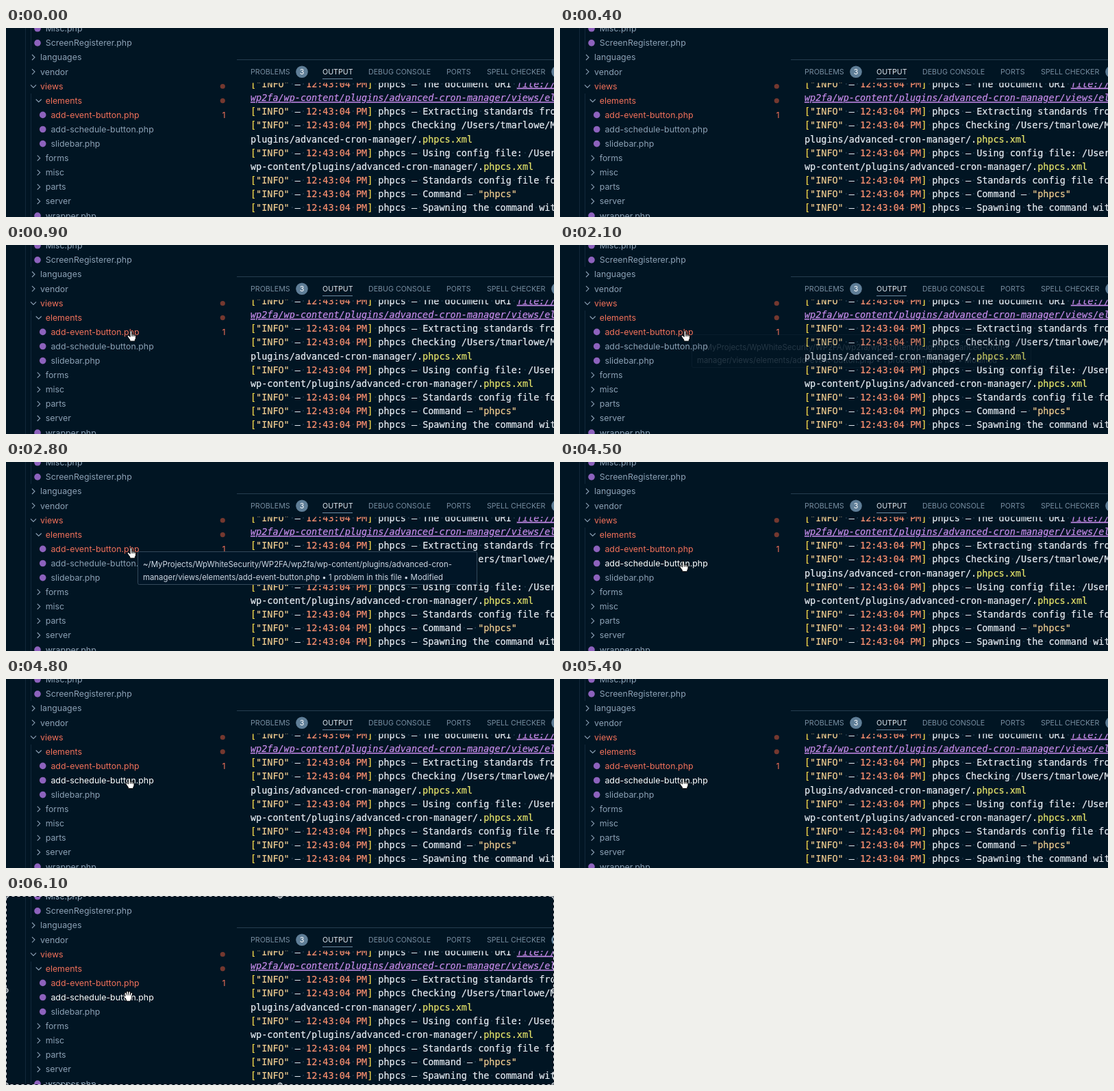
These frames come from a looping animation (800 by 277 pixels, 6.2 s). An HTML page:

```html
<!DOCTYPE html>
<html lang="en">
<head>
<meta charset="utf-8">
<title>File tree hover</title>
<style>
  html, body { margin: 0; width: 100%; height: 100%; overflow: hidden; background: #011523; }
  svg { display: block; width: 100vw; height: 100vh; }
  text { white-space: pre; }
  text, tspan { fill: currentColor; }
  .ui { font: 12.38px Inter, sans-serif; color: #8ca1b5; }
  .hint { font: 11.4px Inter, sans-serif; color: #d0d9e5; }
  .tab { font: 10.65px Inter, sans-serif; color: #788ea1; }
  .log { font: 13.46px "DejaVu Sans Mono", monospace; color: #e6ebf2; }
  .log, .log tspan { stroke: currentColor; stroke-width: .22; }
  .ui.err { color: #f2715a; }
  .ui.hot { color: #fff; }
  .arrow { fill: none; stroke: #8ca1b5; stroke-width: 1.1; }
  .key { color: #f4d84a; }
  .str { color: #efcb8f; }
  .num { color: #fa8f6f; }
  .file { color: #e5e36a; }
  .link { color: #c68bea; font-style: italic; text-decoration: underline; }
  .log.dots { color: #1d3447; stroke: none; }
</style>
</head>
<body>
<svg id="stage" viewBox="0 0 800 277" preserveAspectRatio="none">
  <defs><clipPath id="logClip"><rect x="337" y="80.5" width="463" height="197"/></clipPath></defs>
  <rect width="800" height="277" fill="#011523"/>
  <path d="M28.5 0V277M36.5 0V32M36.5 96V277" stroke="#12283a"/>
  <g id="tree"></g>
  <g id="tabs"></g>
  <g id="log" clip-path="url(#logClip)"></g>
  <g id="tip" opacity="0">
    <rect x="192.5" y="131.5" width="495" height="48" rx="2" fill="#011627" stroke="#34495b"/>
    <text class="hint" x="200" y="153.5">~/MyProjects/WpWhiteSecurity/WP2FA/wp2fa/wp-content/plugins/advanced-cron-</text>
    <text class="hint" x="200" y="172.5">manager/views/elements/add-event-button.php • 1 problem in this file • Modified</text>
  </g>
  <g id="marquee" fill="none">
    <rect x=".5" y=".5" width="799" height="276" stroke="#101820"/>
    <rect x=".5" y=".5" width="799" height="276" stroke="#e4e8ec" stroke-dasharray="4 4"/>
    <g id="grips" fill="#777f87" stroke="#dfe3e7"></g>
  </g>
  <g id="cursor">
    <path id="point" fill="#fff" stroke="#000" stroke-width=".9" stroke-linejoin="round"
      d="M-1.3 1.2Q-1.2-.2 0-.2T1.3 1.2V5Q2 4.4 3.2 5.2 4.4 4.6 5.3 5.8 7 5.4 7 7.5V10Q7 12 5.8 13V15H-1.6V13Q-3.4 11-4.8 8.6-5.6 7-4.4 6.5-3 6.4-1.3 8.6ZM1.3 5V8M3.2 5.4V8M5.2 6V8.2"/>
    <g id="palm" fill="#fff" stroke-linecap="round" stroke-linejoin="round"></g>
  </g>
</svg>
<script>
const LOOP = 6200, STEP = 100, ROW = 21.1;
const $ = id => document.getElementById(id);

function add(parent, tag, attrs, content = '') {
  const el = document.createElementNS('http://www.w3.org/2000/svg', tag);
  for (const k in attrs) el.setAttribute(k, attrs[k]);
  el.innerHTML = content;
  parent.appendChild(el);
  return el;
}

// Tree rows: label, depth, kind (file, closed, open), has error
const rows = [
  ['Misc.php', 1, 'file'], ['ScreenRegisterer.php', 1, 'file'],
  ['languages', 0, 'closed'], ['vendor', 0, 'closed'],
  ['views', 0, 'open', true], ['elements', 1, 'open', true],
  ['add-event-button.php', 2, 'file', true], ['add-schedule-button.php', 2, 'file'],
  ['slidebar.php', 2, 'file'], ['forms', 1, 'closed'], ['misc', 1, 'closed'],
  ['parts', 1, 'closed'], ['server', 1, 'closed'], ['wrapper.php', 1, 'file']
];
const labels = rows.map(([name, depth, kind, err], i) => {
  const tree = $('tree'), y = 0.8 + ROW * i, x = 50 + 7.7 * depth;
  if (kind === 'file') add(tree, 'circle', { cx: x - 11.7, cy: y, r: 4.8, fill: '#8d62bd' });
  else add(tree, 'path', {
    class: 'arrow',
    d: kind === 'open' ? `M${x - 14} ${y - 1.8}l4 4 4-4` : `M${x - 12} ${y - 4}l4 4-4 4`
  });
  if (err && kind === 'open') add(tree, 'circle', { cx: 316.3, cy: y + .3, r: 3.6, fill: '#74382f' });
  if (err && kind === 'file') add(tree, 'text', { class: 'ui err', x: 315.5, y: y + 4.4 }, '1');
  return add(tree, 'text', { class: err ? 'ui err' : 'ui', x, y: y + 4.4 }, name);
});

// Panel header
const tabs = $('tabs');
add(tabs, 'path', { d: 'M337 46.5H800', stroke: '#263d50' });
add(tabs, 'path', { d: 'M462 74.5H506', stroke: '#6d8aa2' });
[['PROBLEMS', 357], ['OUTPUT', 462, '#e3e9f0'], ['DEBUG CONSOLE', 529], ['PORTS', 643], ['SPELL CHECKER', 702]]
  .forEach(([name, x, color]) =>
    add(tabs, 'text', { class: 'tab', x, y: 68, style: color ? `color:${color}` : '' }, name));
for (const cx of [432, 805]) add(tabs, 'circle', { cx, cy: 64.2, r: 8.8, fill: '#5f7e97' });
add(tabs, 'text', { class: 'tab', x: 432, y: 68, 'text-anchor': 'middle', style: 'color:#fff' }, '3');

// Log lines
const span = (cls, s) => `<tspan class="${cls}">${s}</tspan>`;
const stamp = span('key', '[') + span('str', '"INFO"') + ' – ' + span('num', '12:43:04 PM') + span('key', ']') + ' phpcs ';
const config = 'plugins/advanced-cron-manager/.' + span('file', 'phpcs.xml');
[
  stamp + '– The document URI ' + span('link', 'file:///Users'),
  span('link', 'wp2fa/wp-content/plugins/advanced-cron-manager/views/elements'),
  stamp + '– Extracting standards from',
  stamp + 'Checking /Users/tmarlowe/MyProjects',
  config,
  stamp + '– Using config file: /Users/tmarlowe',
  'wp-content/' + config,
  stamp + '– Standards config file found',
  stamp + '– Command – ' + span('str', '"phpcs"'),
  stamp + '– Spawning the command with'
].forEach((line, i) => {
  const pos = { x: 357, y: 86.9 + 20.17 * i };
  const text = add($('log'), 'text', { class: 'log', ...pos }, line);
  const dots = text.textContent.replace(/[^ ]/g, '_').replace(/ /g, '·').replace(/_/g, ' ');
  add($('log'), 'text', { class: 'log dots', ...pos }, dots);
});

// Selection grips and open hand
for (const cx of [0, 400, 800])
  for (const cy of [0, 138.5, 277])
    if (cx !== 400 || cy !== 138.5) add($('grips'), 'circle', { cx, cy, r: 3.3 });
const hand = 'M-3 0L-4.2-4M-1-1L-1.3-5.6M1.3-1L1.8-5.5M3.6 0L4.8-3.6M-3 3L-5.4 .8M-3 0L3.6 0 3.4 4 2 6.5H-1.5L-3 3Z';
add($('palm'), 'path', { d: hand, stroke: '#000', 'stroke-width': 3.2 });
add($('palm'), 'path', { d: hand, stroke: '#fff', 'stroke-width': 1.7 });

// Tracks: [time, ...values]
const path = [[400, 222, 292], [600, 200, 190], [800, 182.5, 126], [2800, 182.5, 126],
  [3100, 180, 145.5], [5800, 180, 145.5], [6000, 178.5, 146.5]];
const fade = [[2050, 0], [2100, .17], [2200, .8], [2300, 1], [2800, 1], [3000, 0]];

function at(track, t) {
  const n = track.findIndex(k => k[0] > t);
  if (n === 0) return track[0].slice(1);
  if (n < 0) return track[track.length - 1].slice(1);
  const a = track[n - 1], b = track[n], p = (t - a[0]) / (b[0] - a[0]);
  return a.slice(1).map((v, i) => v + (b[i + 1] - v) * p);
}

function draw(t) {
  const [x, y] = at(path, t), selecting = t >= 6000;
  const show = (id, on) => { $(id).style.display = on ? '' : 'none'; };
  $('cursor').setAttribute('transform', `translate(${x} ${y})`);
  $('tip').setAttribute('opacity', at(fade, t)[0]);
  show('point', !selecting);
  show('palm', selecting);
  show('marquee', selecting);
  const over = Math.round((y - 0.8) / ROW);
  labels.forEach((el, i) => el.classList.toggle('hot', i === over && !rows[i][3]));
}

const start = performance.now();
function tick() {
  const t = (performance.now() - start) % LOOP;
  draw(Math.floor(t / STEP) * STEP);
  requestAnimationFrame(tick);
}
tick();
</script>
</body>
</html>
```
